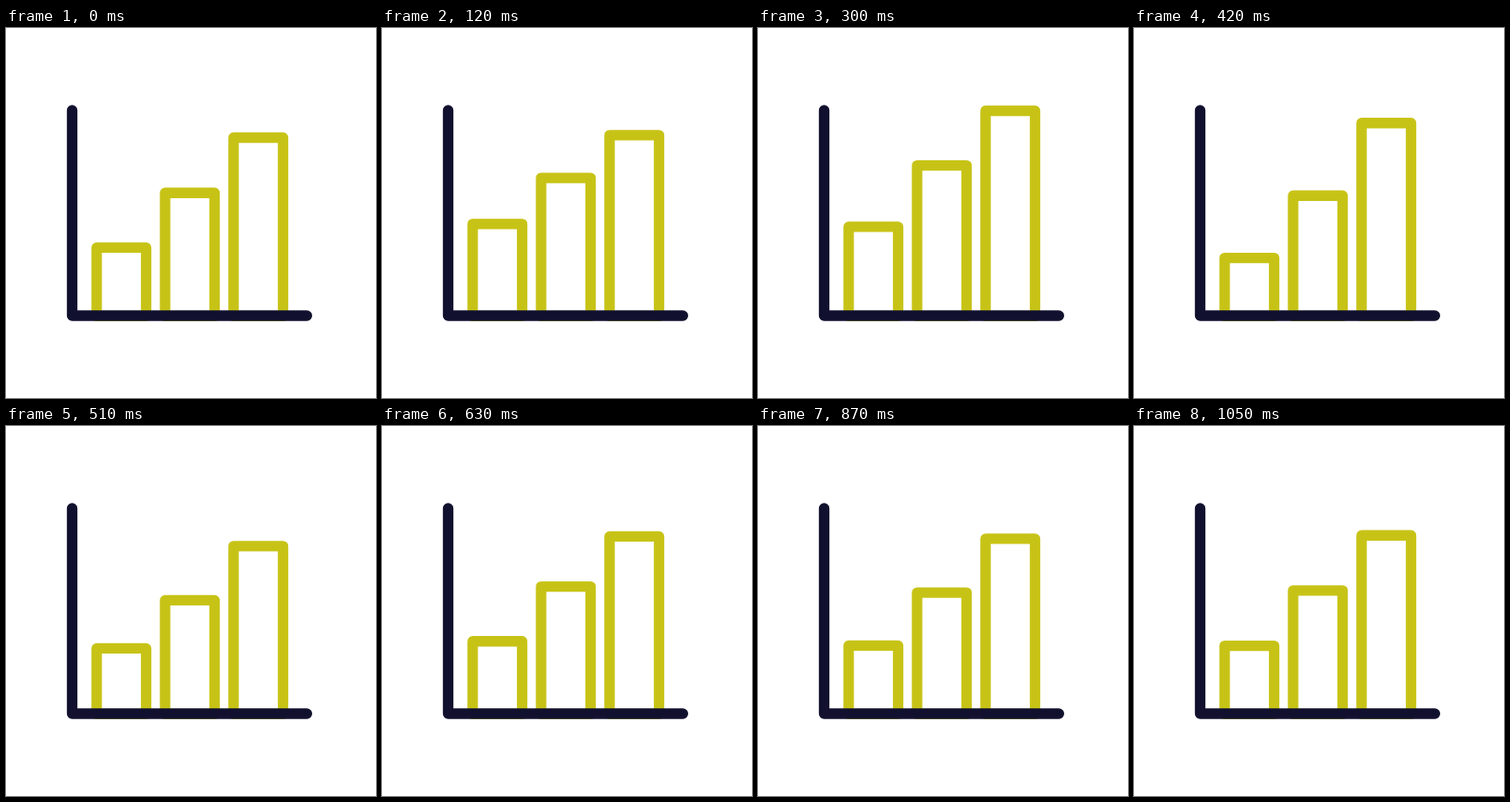
Recreate the animation shown at these times as an HTML page with a canvas. Size 400 px wide and 400 px high, loop 1080 ms.

```html
<!DOCTYPE html>
<html>
<head>
<meta charset="utf-8">
<style>
html, body { margin: 0; width: 100%; height: 100%; overflow: hidden; background: #fff; }
canvas { display: block; width: 400px; height: 400px; }
</style>
</head>
<body>
<canvas id="stage" width="400" height="400"></canvas>
<script>
const ctx = document.getElementById('stage').getContext('2d');
const LOOP = 1080, STEP = 30, STAGGER = 50;
const YELLOW = '#c7c316', NAVY = '#11112f';
const BASE = 311, BAR_WIDTH = 53.5, BAR_GAP = 74, BAR_RISE = 59;

const HEIGHT = 30, PEAK = 240, REST = 360;      // lift in px, times in ms
const SWING = 16.3, DECAY = 0.0045, HALF = 170; // wobble after the fall

// Quick rise, accelerating fall, then a damped wobble
function lift(t) {
  t = (t + LOOP) % LOOP;
  if (t < PEAK) return HEIGHT * (1 - (1 - (t / PEAK) ** 1.4) ** 4);
  if (t < REST) return HEIGHT * (1 - ((t - PEAK) / (REST - PEAK)) ** 2);
  const s = t - REST;
  return -SWING * Math.exp(-DECAY * s) * Math.sin(Math.PI * s / HALF);
}

function stroke(points, color, width, closed) {
  ctx.beginPath();
  points.forEach(p => ctx.lineTo(...p));
  if (closed) ctx.closePath();
  ctx.strokeStyle = color;
  ctx.lineWidth = width;
  ctx.stroke();
}

function drawBar(i, t) {
  const left = 98 + i * BAR_GAP, right = left + BAR_WIDTH;
  const top = 237.4 - i * BAR_RISE - lift(t - i * STAGGER);
  const foot = BASE + 0.4;
  stroke([[left, foot], [left, top], [right, top], [right, foot]], YELLOW, 11.3, true);
}

function draw(t) {
  ctx.fillStyle = '#fff';
  ctx.fillRect(0, 0, 400, 400);
  ctx.lineCap = ctx.lineJoin = 'round';
  for (let i = 0; i < 3; i++) drawBar(i, t);
  stroke([[71.5, 89], [71.5, BASE], [325.3, BASE]], NAVY, 11.4);
}

const start = performance.now();
function tick() {
  const t = (performance.now() - start) % LOOP;
  draw(Math.floor(t / STEP) * STEP);
  requestAnimationFrame(tick);
}
tick();
</script>
</body>
</html>
```
